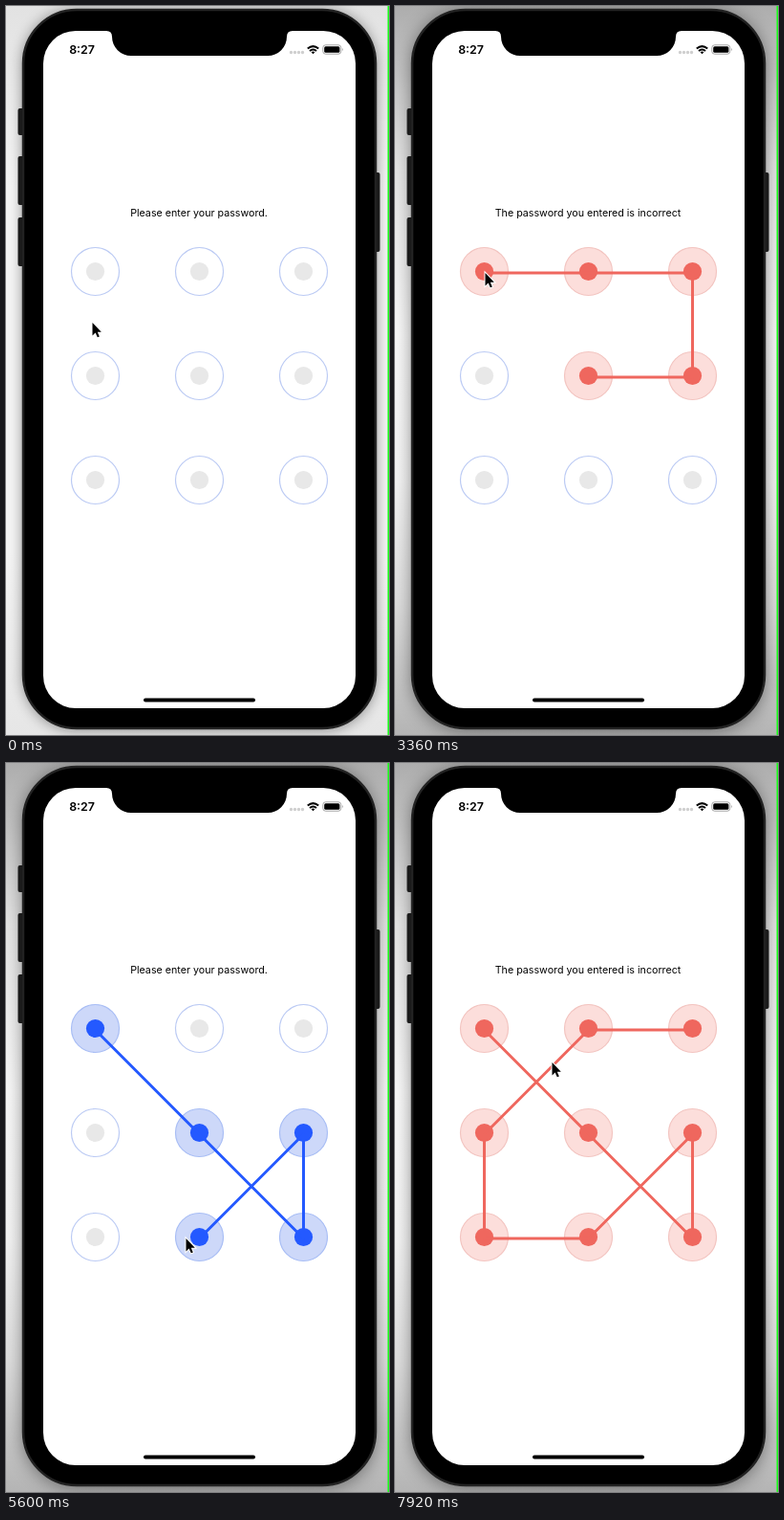
Write an HTML page that moves like this. It is 401 px wide and 762 px high and loops after 8000 ms.

```html
<!DOCTYPE html>
<html lang="en">
<head>
<meta charset="utf-8">
<title>Pattern lock</title>
<style>
  html, body { margin: 0; width: 100%; height: 100%; overflow: hidden; background: #fff; }
  #stage { position: relative; width: 401px; height: 762px; overflow: hidden;
    background: linear-gradient(#e2e2e2, #f4f4f4 25%, #f4f4f4 75%, #e6e6e6); }
  #stage.focused { background: linear-gradient(#adadad, #e4e4e4 22%, #f8f8f8 45%, #f4f4f4 65%, #dedede 82%, #b4b4b4); }
  #shadow { position: absolute; left: 17px; top: 3px; width: 371px; height: 753px; border-radius: 57px;
    box-shadow: 0 1px 14px rgba(0, 0, 0, .4); }
  .focused #shadow { box-shadow: 0 2px 18px rgba(0, 0, 0, .42); }
  svg { position: absolute; left: 0; top: 0; display: block; }
  text { font-family: Inter, Roboto, sans-serif; }
  .ring { fill: #fff; stroke: #bccbf4; stroke-width: 1.2; }
  .dot { fill: #e8e8e8; }
  .on .ring { fill: #cdd8f9; stroke: #a9bef5; }
  .on .dot { fill: #2459ff; }
  .wrong .on .ring { fill: #fcdedb; stroke: #f3c5c1; }
  .wrong .on .dot { fill: #ef675e; }
  #trail { fill: none; stroke: #2459ff; stroke-width: 3; stroke-linejoin: round; }
  .wrong #trail { stroke: #ef675e; }
</style>
</head>
<body>
<div id="stage">
  <div id="shadow"></div>
  <svg width="401" height="762" viewBox="0 0 401 762">
    <g fill="#1a1a1a">
      <rect x="12.5" y="107" width="7" height="28" rx="2"/>
      <rect x="12.5" y="157" width="7" height="51" rx="2"/>
      <rect x="12.5" y="221" width="7" height="51" rx="2"/>
      <rect x="385" y="174" width="6.5" height="83" rx="2"/>
    </g>
    <rect x="18" y="4" width="369" height="751" rx="56" stroke="#222" stroke-width="2.5"/>
    <rect x="39" y="26" width="327" height="708" rx="34" fill="#fff"/>
    <path d="M105 25.5V26Q111 26 111 32A20 20 0 0 0 131 52H274A20 20 0 0 0 294 32Q294 26 300 26V25.5Z"/>
    <text x="66.2" y="50" font-size="12.4" font-weight="600">8:27</text>
    <path d="M298.5 48.5h13" stroke="#cfcfcf" stroke-width="3.4" stroke-linecap="round" stroke-dasharray="0 4"/>
    <g fill="none" stroke="#000" stroke-width="2">
      <path d="M315.8 44.6Q321.5 39.6 327.2 44.6M318 47.1Q321.5 44 325 47.1"/>
      <path d="M319.6 48.2Q321.5 46.6 323.4 48.2L321.5 50.2Z" fill="#000" stroke="none"/>
    </g>
    <rect x="331.8" y="40.8" width="19" height="9.4" rx="2.8" fill="none" stroke="#a5a5a5"/>
    <rect x="333.2" y="42.2" width="16.2" height="6.6" rx="1.5"/>
    <path d="M352 43.8Q353.8 45.5 352 47.2Z" fill="#a5a5a5"/>
    <text id="message" x="202" y="220" font-size="10.7" text-anchor="middle"></text>
    <g id="lock">
      <g id="nodes"></g>
      <path id="trail"/>
    </g>
    <rect x="144" y="723.5" width="117" height="4" rx="2"/>
    <path id="cursor" d="M.5 1V14.4L3.6 11.5L5.8 16.3L7.8 15.4L5.8 10.7H9.8Z" stroke="#fff" stroke-width="2" paint-order="stroke"/>
    <rect x="399.5" width="1.5" height="762" fill="#18ff18"/>
  </svg>
</div>
<script>
const LOOP = 8000, STEP = 80;
const PITCH = 109, RADIUS = 25;
const HOLD = 400;           // ms between the last node and the rejection
const RETURN_SPEED = 0.39;  // px per ms
const HOME = { x: 90, y: 330 };

const $ = id => document.getElementById(id);
const center = i => ({ x: 93.5 + PITCH * (i % 3), y: 277.5 + PITCH * Math.floor(i / 3) });
const distance = (a, b) => Math.hypot(a.x - b.x, a.y - b.y);

function svgElement(name, attrs = {}) {
  const element = document.createElementNS('http://www.w3.org/2000/svg', name);
  for (const key in attrs) element.setAttribute(key, attrs[key]);
  return element;
}

const nodes = Array.from({ length: 9 }, (_, i) => {
  const { x, y } = center(i);
  const group = svgElement('g');
  group.append(
    svgElement('circle', { class: 'ring', cx: x, cy: y, r: RADIUS }),
    svgElement('circle', { class: 'dot', cx: x, cy: y, r: 9.6 }));
  $('nodes').append(group);
  return group;
});

const attempts = [
  { press: 520, speed: 0.218, order: [0, 1, 2, 5, 4] },
  { press: 3680, speed: 0.305, order: [0, 4, 8, 5, 7, 6, 3, 1, 2] }
];

// Pointer waypoints; a node lights up once the pointer is inside its ring.
const route = [{ t: 0, ...HOME }, { t: 400, ...center(0) }];
attempts.forEach((attempt, n) => {
  let t = attempt.press;
  let spot = center(attempt.order[0]);
  route.push({ t, ...spot });
  attempt.hits = attempt.order.map((node, k) => {
    const next = center(node);
    t += distance(spot, next) / attempt.speed;
    spot = next;
    route.push({ t, ...spot });
    return { node, t: k ? t - RADIUS / attempt.speed : t };
  });
  attempt.fail = t + HOLD;
  const rest = attempts[n + 1] ? center(0) : HOME;
  route.push({ t: attempt.fail, ...spot });
  route.push({ t: attempt.fail + distance(spot, rest) / RETURN_SPEED, ...rest });
});

function pointerAt(t) {
  const next = route.findIndex(stop => stop.t > t);
  const a = route[next - 1], b = route[next];
  const k = (t - a.t) / (b.t - a.t);
  return [a.x + (b.x - a.x) * k, a.y + (b.y - a.y) * k].map(Math.round);
}

function render(t) {
  const attempt = attempts.filter(a => a.press <= t).pop();
  const reached = attempt ? attempt.hits.filter(hit => hit.t <= t).map(hit => hit.node) : [];
  const wrong = !!attempt && t >= attempt.fail;
  const points = reached.map(center).map(p => `${p.x} ${p.y + 1.5}`);

  $('stage').classList.toggle('focused', !!attempt);
  $('lock').classList.toggle('wrong', wrong);
  nodes.forEach((node, i) => node.classList.toggle('on', reached.includes(i)));
  $('trail').setAttribute('d', points.length > 1 ? 'M' + points.join('L') : '');
  $('message').textContent = wrong
    ? 'The password you entered is incorrect' : 'Please enter your password.';
  $('cursor').setAttribute('transform', `translate(${pointerAt(t).join(' ')})`);
}

const begin = performance.now();
function tick() {
  const t = (performance.now() - begin) % LOOP;
  render(Math.floor(t / STEP) * STEP);
  requestAnimationFrame(tick);
}
tick();
</script>
</body>
</html>
```
